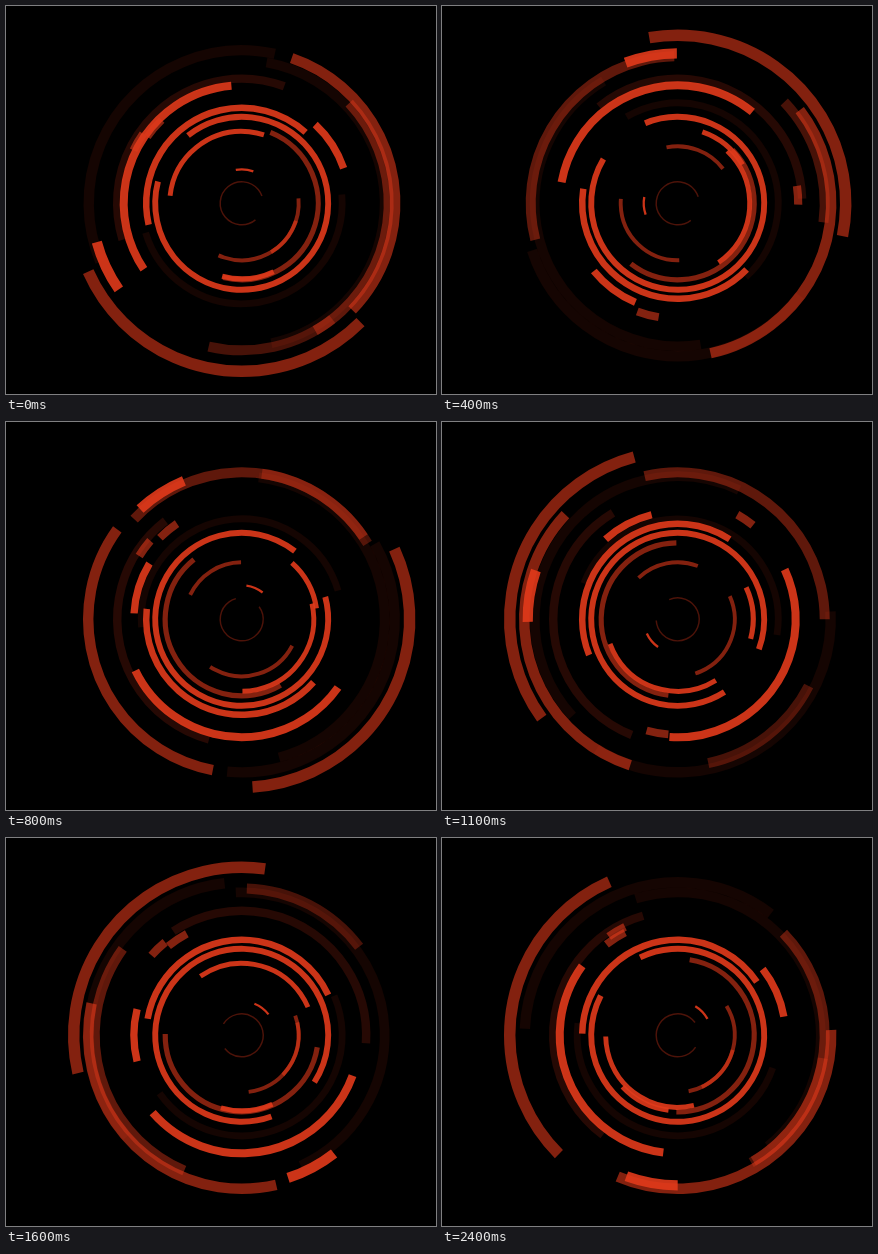
These frames come from a looping animation (430 px wide and 388 px high, 2500 ms). An HTML page with a canvas:

```html
<!DOCTYPE html>
<html lang="en">
<head>
<meta charset="utf-8">
<title>Rotating rings</title>
<style>
  html, body { margin: 0; width: 100%; height: 100%; overflow: hidden; background: #000; }
  canvas { display: block; }
</style>
</head>
<body>
<canvas id="stage" width="430" height="388"></canvas>
<script>
const ctx = document.getElementById('stage').getContext('2d');
const CENTER = [235.7, 197.3];
const STEP = 100;
const STEPS = 25;
const KEY_STEPS = [0, 2, 6, 11, 16, 20, 24];
const BRIGHT = 0.9, SOFT = 0.58, DIM = 0.42, DARK = 0.17, FAINT = 0.09;
const rad = degrees => degrees * Math.PI / 180;

// Sways around a mean angle, a whole number of cycles per loop.
function sway(mean, swing, cycles, peak) {
  return step => mean + swing * Math.cos(rad(360 * cycles * step / STEPS - peak));
}

// Smooth closed path through a few angles; ends a whole number of turns on.
function wander(...keys) {
  const n = keys.length;
  const turns = Math.round((keys[n - 1] - keys[0]) / 360);
  const lap = i => Math.floor(i / n);
  const time = i => KEY_STEPS[(i + n) % n] + lap(i) * STEPS;
  const value = i => keys[(i + n) % n] + lap(i) * turns * 360;
  const gap = i => time(i + 1) - time(i);
  const slope = i => (value(i + 1) - value(i)) / gap(i);
  const tangent = i =>
    (slope(i - 1) * gap(i) + slope(i) * gap(i - 1)) / (gap(i - 1) + gap(i));

  return step => {
    const i = KEY_STEPS.findLastIndex(key => key <= step);
    const h = gap(i);
    const u = (step - time(i)) / h;
    const v = 1 - u;
    return value(i) * v * v * (1 + 2 * u)
      + value(i + 1) * u * u * (3 - 2 * u)
      + h * u * v * (tangent(i) * v - tangent(i + 1) * u);
  };
}

const rings = [];
function ring(radius, span, alpha, angle) {
  rings.push({ radius, span, alpha, angle });
}

// Background
ring(153, 125, FAINT, sway(95, 125, 1, -60));
ring(143, 158, FAINT, sway(180, 100, 3, 0));
ring(124.5, 127, DARK, sway(163, 75, 2, 90));
ring(100.5, 168, FAINT, sway(-65, 120, 1, -60));
ring(21.5, 290, DARK * 2, sway(-45, 110, 1, 30));

// Outer
ring(147, 51, DIM * 0.75, wander(52, 46, -127, 27, -88, 71, 9));
ring(147, 103, DIM, wander(317, 470, 541, 617, 473, 545, 676));
ring(153.5, 115, SOFT, wander(289, 247, 426, 468, 437, 364, 358));
ring(168, 111, SOFT, wander(45, 240, 239, 504, 527, 497, 495));
ring(150, 20, BRIGHT, wander(145, 225, 243, 179, 52, -10, 90));

// Middle
ring(120.5, 9, SOFT, sway(280, 75, 3, 190));
ring(115.5, 11, SOFT, sway(160, 72, 3, 320));
ring(118, 119, BRIGHT, wander(146, 236, 96, -25, 20, 233, 97));
ring(107.8, 28, BRIGHT, wander(-47, 62, 140, 228, 166, 232, 322));
ring(95.5, 145, BRIGHT, wander(167, 117, -5, 158, 190, 249, 181));
ring(86.5, 323, BRIGHT, sway(335, 110, 1, 200));

// Inner
ring(76.5, 172, SOFT, wander(-68, -85, 15, 97, 9, 163, 279));
ring(72, 102, BRIGHT, wander(186, 304, 294, 418, 235, 193, 77));
ring(75.5, 40, BRIGHT, wander(65, -48, -54, -25, 66, -3, 97));
ring(57, 96, SOFT, wander(18, 84, 62, -24, -13, 147, 329));
ring(57, 64, SOFT, sway(-55, 100, 1, -60));
ring(34, 30, BRIGHT, sway(215, 90, 3, 300));

function drawRing({ radius, span, alpha, angle }, step) {
  const start = rad(angle(step));
  ctx.globalAlpha = alpha;
  ctx.lineWidth = radius / 14.7;
  ctx.beginPath();
  ctx.arc(...CENTER, radius, start, start + rad(span));
  ctx.stroke();
}

const begin = performance.now();
function draw() {
  const elapsed = Math.max(0, performance.now() - begin);
  const step = Math.floor(elapsed / STEP) % STEPS;
  ctx.globalAlpha = 1;
  ctx.fillStyle = '#000';
  ctx.fillRect(0, 0, 430, 388);
  ctx.strokeStyle = '#e23a1b';
  for (const item of rings) drawRing(item, step);
  requestAnimationFrame(draw);
}
draw();
</script>
</body>
</html>
```
